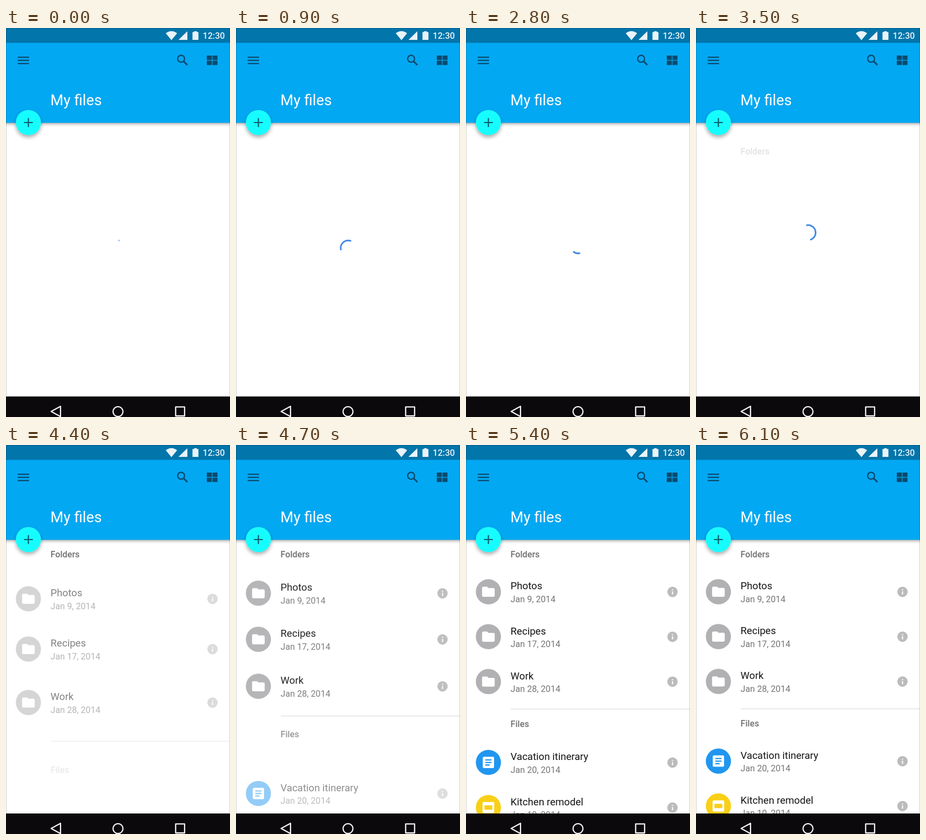
An HTML page for the animation above (7.8 s loop, 415 by 720 pixels).

```html
<!DOCTYPE html>
<html lang="en">
<head>
<meta charset="utf-8">
<title>My files</title>
<style>
  html, body { margin: 0; width: 100%; height: 100%; overflow: hidden; background: #fff; }
  svg { display: block; width: 100%; height: 100%; font-family: Roboto, sans-serif; }
  .section { font-size: 16.15px; font-weight: 500; fill: #6f6f72; }
  .name { font-size: 18.6px; fill: #151515; }
  .date { font-size: 16.15px; fill: #757575; }
  .icon { fill: #0b4a6d; }
  .nav { fill: none; stroke: #f4f4f4; stroke-width: 2.3; stroke-linejoin: round; }
</style>
</head>
<body>
<svg viewBox="0 0 415 720">
  <defs>
    <linearGradient id="shade" x2="0" y2="1">
      <stop offset="0" stop-opacity=".34"/>
      <stop offset=".4" stop-opacity=".13"/>
      <stop offset="1" stop-opacity="0"/>
    </linearGradient>
    <filter id="lift" x="-50%" y="-50%" width="200%" height="200%">
      <feDropShadow dx="0" dy="4" stdDeviation="3.5" flood-opacity=".34"/>
    </filter>
  </defs>
  <rect width="415" height="720" fill="#fff"/>
  <g id="list"></g>
  <circle id="spinner" cx="207.8" r="13.8" fill="none" stroke="#4489e6" stroke-width="3" pathLength="360"/>

  <rect y="175" width="415" height="8" fill="url(#shade)"/>
  <rect y="27" width="415" height="148.5" fill="#03a8f3"/>
  <rect width="415" height="27.5" fill="#0275aa"/>
  <g fill="#e9f3f8">
    <path d="M296 9.8Q306.5 1.8 317 9.8L306.5 22.5Z"/>
    <path d="M336 6V22H319.5Z"/>
    <path d="M345.5 7.6h3V6h5v1.6h3V22h-11Z"/>
    <text x="364.5" y="19.9" font-size="16.15" font-weight="500">12:30</text>
  </g>
  <g class="icon">
    <path d="M21.7 52.9h21v2.3h-21zM21.7 58.8h21v2.3h-21zM21.7 64.7h21v2.3h-21z"/>
    <path d="M372 51h9.3v8.2H372zM382.5 51h9.3v8.2h-9.3zM372 60.4h9.3v8.2H372zM382.5 60.4h9.3v8.2h-9.3z"/>
  </g>
  <g fill="none" stroke="#0b4a6d" stroke-width="2.4">
    <circle cx="324.4" cy="56.9" r="6.4"/>
    <path d="M328.8 61.4L336 68.6" stroke-width="2.9"/>
  </g>
  <text x="82.3" y="143" font-size="27.7" fill="#fff">My files</text>
  <circle cx="41.5" cy="175" r="23.3" fill="#18fdff" filter="url(#lift)"/>
  <path d="M33.3 175h16.4M41.5 166.8v16.4" stroke="#0c5a6b" stroke-width="2.2"/>

  <path d="M.5 0V682M414.5 0V682M0 .5H415" stroke="#000" stroke-opacity=".18"/>
  <rect y="682" width="415" height="38" fill="#0b090c"/>
  <path class="nav" d="M83.6 709.7L101 700.2V719.2Z"/>
  <circle class="nav" cx="207.5" cy="710" r="9.2"/>
  <rect class="nav" x="314.3" y="701.4" width="16.6" height="16.6"/>
</svg>
<script>
const LOOP = 7800, STEP = 100;
const clamp = v => Math.min(1, Math.max(0, v));

const glyphs = {
  folder: ['#b1b0b3', '<path fill="#fff" d="M-9.4-9.4h7l2.4 2.4h9.4q2.3 0 2.3 2.3V7q0 2.4-2.3 2.4H-9.4q-2.3 0-2.3-2.4V-7q0-2.4 2.3-2.4Z"/>'],
  text: ['#2196f0', `<rect x="-10.5" y="-10.5" width="21" height="21" rx="2.3" fill="#fff"/>
    <path d="M-5.8-4.7H5.8M-5.8 0H5.8M-5.8 4.7H2.3" stroke="#2196f0" stroke-width="2.3"/>`],
  slides: ['#f9cf17', `<rect x="-10.8" y="-10.3" width="21.6" height="20.6" rx="2.3" fill="#fff"/>
    <rect x="-7.2" y="-4" width="14.4" height="8" fill="#f9cf17"/>`]
};

const section = (label, y) => `<text class="section" x="82.6" y="${y}">${label}</text>`;

const row = (kind, name, date, y) => `<g transform="translate(0 ${y})">
  <g transform="translate(41.5 0)"><circle r="23.3" fill="${glyphs[kind][0]}"/>${glyphs[kind][1]}</g>
  <text class="name" x="82.6" y="-4.2">${name}</text>
  <text class="date" x="82.6" y="19">${date}</text>
  <g transform="translate(382.6 .2)"><circle r="9.6" fill="#bbbbbc"/>
    <path d="M0-4.9v2M0-1v5.9" stroke="#fff" stroke-width="2"/></g>
</g>`;

// Each part glides up: `drop` px below its place at time `at`, decaying with `tau`.
const parts = [
  { art: section('Folders', 207.6), at: 3500, drop: 26, tau: 200, fade: [3400, 500] },
  { art: row('folder', 'Photos', 'Jan 9, 2014', 271.6), at: 4400, drop: 13, tau: 190, fade: [4000, 750] },
  { art: row('folder', 'Recipes', 'Jan 17, 2014', 354.6), at: 4400, drop: 23, tau: 196, fade: [4000, 750] },
  { art: row('folder', 'Work', 'Jan 28, 2014', 437.6), at: 4400, drop: 39, tau: 203, fade: [4000, 750] },
  { art: '<path d="M83 488.3H415" stroke="#dcdcdc" stroke-width="1.2"/>', at: 4400, drop: 60, tau: 200, fade: [4000, 750] },
  { art: section('Files', 521), at: 4400, drop: 86, tau: 207, fade: [4320, 530] },
  { art: row('text', 'Vacation itinerary', 'Jan 20, 2014', 585), at: 4700, drop: 60, tau: 222, fade: [4400, 620] },
  { art: row('slides', 'Kitchen remodel', 'Jan 10, 2014', 668), at: 5100, drop: 11.5, tau: 222, fade: [4500, 650] }
];

const list = document.getElementById('list');
const spinner = document.getElementById('spinner');
list.innerHTML = parts.map(p => `<g>${p.art}</g>`).join('');
parts.forEach((p, i) => p.node = list.children[i]);

// cubic-bezier(.4, 0, .2, 1)
function ease(x) {
  let lo = 0, hi = 1;
  for (let i = 0; i < 20; i++) {
    const s = (lo + hi) / 2, r = 1 - s;
    if (1.2 * r * r * s + 0.6 * r * s * s + s ** 3 < x) lo = s; else hi = s;
  }
  return 3 * (1 - lo) * lo * lo + lo ** 3;
}

function drawSpinner(t) {
  const period = 1322, reach = 278, turn = 0.1173;
  const cycle = Math.floor(t / period), phase = t / period - cycle;
  const head = reach * ease(clamp(phase * 2));
  const tail = reach * ease(clamp(phase * 2 - 1));
  const cy = 407 - 2.34e-5 * Math.max(0, t - 2400) ** 2;
  const angle = cycle * reach + tail + turn * t - 90;
  spinner.setAttribute('cy', cy);
  spinner.setAttribute('stroke-dasharray', `${Math.max(12, head - tail)} 360`);
  spinner.setAttribute('transform', `rotate(${angle} 207.8 ${cy})`);
  spinner.setAttribute('opacity', t < 3 * period ? clamp(0.5 + t / 200) : 0);
}

function draw(t) {
  drawSpinner(t);
  for (const { node, at, drop, tau, fade } of parts) {
    node.setAttribute('transform', `translate(0 ${drop * Math.exp((at - t) / tau)})`);
    node.setAttribute('opacity', clamp((t - fade[0]) / fade[1]));
  }
}

const start = performance.now();
function tick() {
  const t = (performance.now() - start) % LOOP;
  draw(Math.min(6100, Math.floor(t / STEP) * STEP));
  requestAnimationFrame(tick);
}
tick();
</script>
</body>
</html>
```
